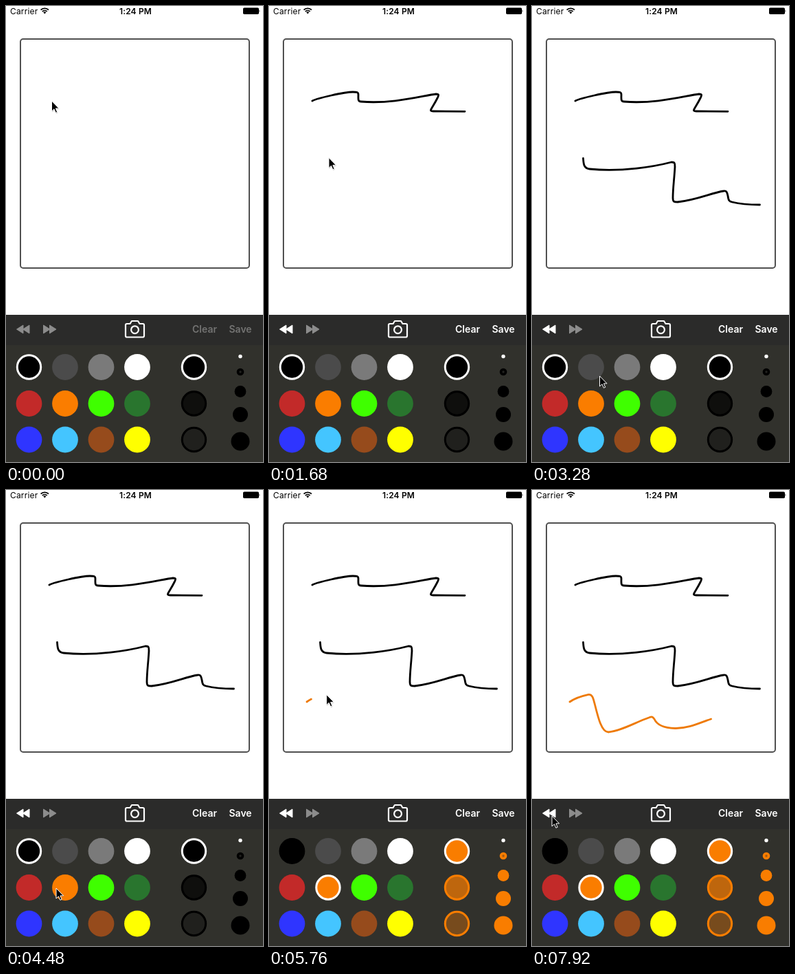
An HTML page that plays this animation: 374 px wide and 663 px high, repeating every 8 s.

```html
<!DOCTYPE html>
<html>
<head>
<meta charset="utf-8">
<style>
  html, body { margin: 0; width: 100%; height: 100%; overflow: hidden; background: #fff; }
  svg { display: block; width: 374px; height: 663px; font-family: Inter, Roboto, sans-serif; }
  .line { fill: none; stroke-width: 2.8; stroke-linecap: round; stroke-linejoin: round; }
  .tool { font-size: 14px; font-weight: 600; }
</style>
</head>
<body>
<svg viewBox="0 0 374 663">
  <text x="6" y="11.5" font-size="12" letter-spacing=".15">Carrier</text>
  <g fill="none" stroke="#000" stroke-width="1.9">
    <path d="M50.6 5.7A8.1 8.1 0 0 1 62 5.7M52.9 8A4.9 4.9 0 0 1 59.7 8"/>
    <path d="M54.3 9.3A2.9 2.9 0 0 1 58.3 9.3L56.3 11.5Z" fill="#000" stroke="none"/>
  </g>
  <text x="188.5" y="11.5" font-size="12" font-weight="600" text-anchor="middle" letter-spacing=".15">1:24 PM</text>
  <rect x="345" y="2.5" width="23" height="9.5" rx="1.8"/>
  <path d="M368.6 5.3Q370.2 7.2 368.6 9.2Z"/>

  <rect x="21" y="48" width="333" height="333" rx="4" fill="#fff" stroke="#505050" stroke-width="2"/>
  <g id="lines"></g>

  <rect y="449" width="374" height="44" fill="#2b2b2a"/>
  <rect y="493" width="374" height="170" fill="#31312c"/>
  <path id="undo" d="M25 464V476L15.5 470ZM34 464V476L24.5 470Z" stroke-width="1" stroke-linejoin="round"/>
  <path d="M54.500 464V476L64 470ZM63.500 464V476L73 470Z" fill="#8c8c8c" stroke="#8c8c8c" stroke-linejoin="round"/>
  <g fill="none" stroke="#fff" stroke-width="2.2" stroke-linejoin="round">
    <path d="M176 462H180.500L183 458H192L194.500 462H199Q201 462 201 464V479.500Q201 481.500 199 481.500H176Q174 481.500 174 479.500V464Q174 462 176 462Z"/>
    <circle cx="187.500" cy="470.700" r="5.400"/>
  </g>
  <text class="tool" x="271" y="475">Clear</text>
  <text class="tool" x="324.500" y="475">Save</text>
  <g id="palette"></g>

  <g id="cursor">
    <path d="M0 0V15L3.500 11.800L5.900 17.300L8.200 16.300L5.900 10.900H10.600Z" fill="#000" opacity=".22" transform="translate(.6 1.300)"/>
    <path d="M0 0V15L3.500 11.800L5.900 17.300L8.200 16.300L5.900 10.900H10.600Z" stroke="#fff" stroke-width="1"/>
  </g>
</svg>
<script>
const LOOP = 8000, STEP = 80, LAG = 72, PICK = 4720;
const ORANGE = '#f97d00';
const $ = id => document.getElementById(id);

function add(parent, tag, attrs) {
  const el = document.createElementNS('http://www.w3.org/2000/svg', tag);
  for (const k in attrs) el.setAttribute(k, attrs[k]);
  return parent.appendChild(el);
}

const strokes = [
  { from: 240, to: 1120, color: '#000', d: 'M63 138C70 134 110 125 122 125C128 125 130 125 130 129C130 135 129 139 134 139C180 143 225 130 243 128C248 128 247 130 245 134C241 142 238 146 236 150C235 152 235 153 239 153L285 153.300' },
  { from: 1800, to: 2640, color: '#000', d: 'M74.500 221.500C75 229 75 236 84 237C130 242 180 233 203 227C208 227 208 229 208 234C207 252 205 265 205 279C205 285 207 285 212 285C240 282 260 272 279 269C283 268 284 271 285 276C286 283 287 284 291 285C303 288 315 289 331.500 289' },
  { from: 5620, to: 6240, color: '#ee7a08', d: 'M55 308C65 301 75 299 82 297.500C88 297 89 303 91 310C96 330 101 352 111 352C128 351 150 338 170 331C175 329 176 330 178 333C182 342 192 346 208 346.500C228 347 245 338 260.500 333' }
];
for (const s of strokes) {
  s.el = add($('lines'), 'path', { class: 'line', d: s.d, stroke: s.color });
  s.len = s.el.getTotalLength();
}

// Cursor rest points between the strokes: time, x, y
const stops = [
  [0, 66.5, 138], [240, 63, 138], [1120, 285, 153], [1680, 87, 220.5], [1800, 74.5, 221.5],
  [2640, 331.5, 289], [2720, 331.5, 289], [3280, 98.5, 538], [3440, 98.5, 538], [3920, 73, 579],
  [4880, 73, 579], [5520, 55, 308], [5620, 55, 308], [6240, 260.5, 333], [6320, 261, 333],
  [7280, 29, 474], [LOOP, 29, 474]
];

// Colour swatches
const colors = ['#000', '#4b4b4b', '#7a7a7a', '#fff', '#c22a29', '#fa7d00',
  '#3fff00', '#29752e', '#2f35ff', '#44c5ff', '#964b1c', '#ffff00'];
const rows = [525, 578, 630.5];
const pal = $('palette');
const swatches = colors.map((fill, i) => add(pal, 'circle',
  { cx: 33.5 + i % 4 * 52.5, cy: rows[i / 4 | 0], fill, stroke: '#fff' }));
const brushes = [1, .7, .35].map((a, i) => add(pal, 'circle',
  { cx: 273.5, cy: rows[i], r: 17.2, 'stroke-width': 3, 'fill-opacity': a }));
const dots = [[532, 5.3], [560.5, 8.4], [594, 11], [633, 13.5]].map(([cy, r]) =>
  add(pal, 'circle', { cx: 341, cy, r }));
add(pal, 'circle', { cx: 341, cy: 509.5, r: 2.7, fill: '#fff' });
const mark = add(pal, 'circle', { cx: 341, cy: 532, r: 1.7 });

const clamp = u => Math.max(0, Math.min(1, u));
const ease = u => (1 - Math.cos(Math.PI * clamp(u))) / 2;
const progress = (s, t) => ease((t - s.from) / (s.to - s.from));

function cursorAt(t) {
  const s = strokes.find(s => t >= s.from && t <= s.to);
  if (s) {
    const p = s.el.getPointAtLength(s.len * progress(s, t));
    return [p.x, p.y];
  }
  const i = stops.findIndex(k => k[0] > t);
  const [t0, x0, y0] = stops[i - 1], [t1, x1, y1] = stops[i];
  const u = ease((t - t0) / (t1 - t0));
  return [x0 + (x1 - x0) * u, y0 + (y1 - y0) * u];
}

function draw(t) {
  for (const s of strokes) {
    const p = progress(s, t - LAG);
    s.el.style.display = p > 0 ? '' : 'none';
    s.el.setAttribute('stroke-dasharray', p < 1 ? `${p * s.len} 999` : 'none');
  }

  const active = t >= strokes[0].to + LAG;
  $('undo').style.fill = $('undo').style.stroke = active ? '#fff' : '#8c8c8c';
  document.querySelectorAll('.tool').forEach(el => el.style.fill = active ? '#fff' : '#737372');

  const picked = t >= PICK, ink = picked ? ORANGE : '#000';
  swatches.forEach((el, i) => {
    const on = i === (picked ? 5 : 0);
    el.setAttribute('r', on ? 17.2 : 18.9);
    el.setAttribute('stroke-width', on ? 3 : 0);
  });
  brushes.forEach((el, i) => {
    el.style.fill = ink;
    el.style.stroke = i ? ink : '#fff';
  });
  dots.forEach(el => el.style.fill = ink);
  mark.style.fill = picked ? '#9b5a18' : '#22221f';

  $('cursor').setAttribute('transform', `translate(${cursorAt(t)})`);
}

function tick() {
  draw(Math.floor(performance.now() % LOOP / STEP) * STEP);
  requestAnimationFrame(tick);
}
tick();
</script>
</body>
</html>
```
